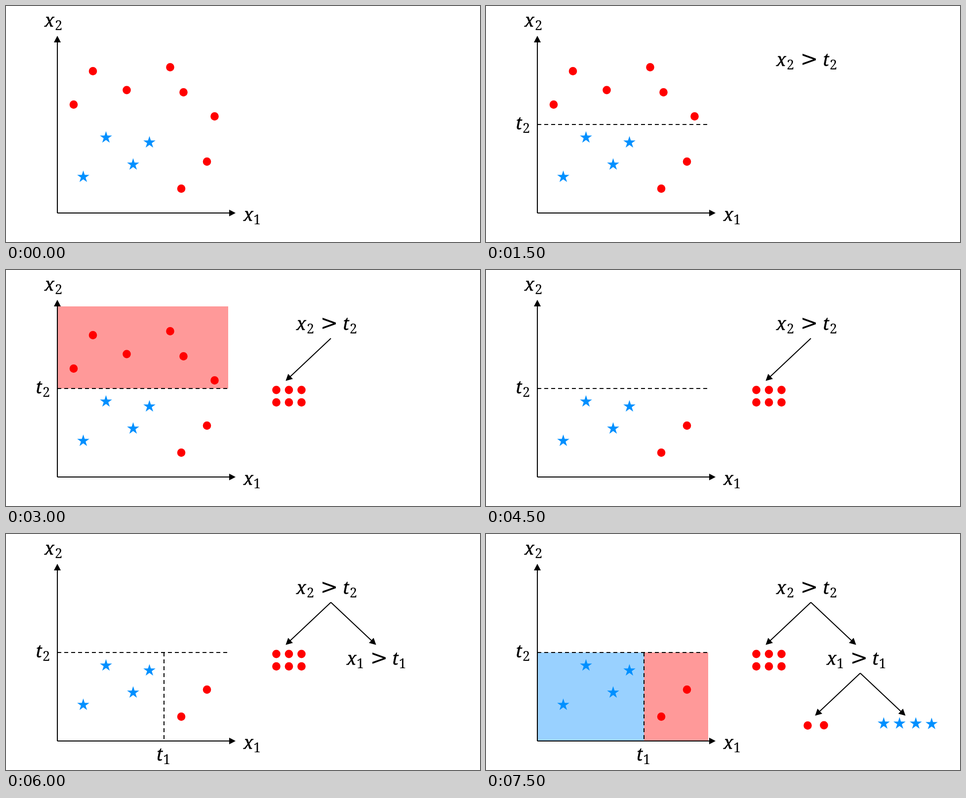
An HTML page for the animation above (8 s loop, 960 by 480 pixels).

```html
<!DOCTYPE html>
<html lang="en">
<head>
<meta charset="utf-8">
<title>Decision tree splits</title>
<style>
  html, body { margin: 0; width: 100%; height: 100%; overflow: hidden; background: #fff; }
  svg { display: block; width: 100%; height: 100%; }

  .line { fill: none; stroke: #000; stroke-width: 2; }
  .dash { stroke-dasharray: 8 6; }
  .arrow { marker-end: url(#head); }
  .red { fill: #f00; }
  .blue { fill: #0090ff; }
  .red-area { fill: #f99; }
  .blue-area { fill: #99d1ff; }

  text { font-family: "Noto Serif", serif; }
  .var { font-size: 36px; font-style: italic; stroke: #000; stroke-width: .4px; }
  .sub { font-size: 27px; }
  .op { font-size: 43px; font-family: "DejaVu Sans", sans-serif; }

  .split2, .area2, .leaf2, .points2, .split1, .result { animation: 8s step-end infinite; }
  .split2 { animation-name: split2; }
  .area2 { animation-name: area2; }
  .leaf2 { animation-name: leaf2; }
  .points2 { animation-name: points2; }
  .split1 { animation-name: split1; }
  .result { animation-name: result; }
  @keyframes split2 { 0% { opacity: 0 } 18.75%, 100% { opacity: 1 } }
  @keyframes area2 { 0% { opacity: 0 } 37.5% { opacity: 1 } 56.25%, 100% { opacity: 0 } }
  @keyframes leaf2 { 0% { opacity: 0 } 37.5%, 100% { opacity: 1 } }
  @keyframes points2 { 0% { opacity: 1 } 56.25%, 100% { opacity: 0 } }
  @keyframes split1 { 0% { opacity: 0 } 75%, 100% { opacity: 1 } }
  @keyframes result { 0% { opacity: 0 } 93.75%, 100% { opacity: 1 } }
</style>
</head>
<body>
<svg viewBox="0 0 960 480">
  <defs>
    <marker id="head" markerUnits="userSpaceOnUse" markerWidth="14" markerHeight="14" refX="1" refY="7" orient="auto">
      <path d="M0 0L13.5 7L0 14Z"/>
    </marker>
    <ellipse id="dot" class="red" rx="8.3" ry="8.5"/>
    <path id="star" class="blue" d="M0-13L2.9-4H12.3L4.7 1.6L7.6 10.5L0 5L-7.6 10.5L-4.7 1.6L-12.3-4H-2.9Z"/>
    <g id="x1"><text class="var">x</text><text class="sub" x="20" y="7.3">1</text></g>
    <g id="x2"><text class="var">x</text><text class="sub" x="21" y="7.3">2</text></g>
    <g id="t1"><text class="var">t</text><text class="sub" x="13.5" y="7.3">1</text></g>
    <g id="t2"><text class="var">t</text><text class="sub" x="14" y="7.3">2</text></g>
    <path id="left" class="line arrow" d="M0 0L-82.5 78"/>
    <path id="right" class="line arrow" d="M0 0L82.5 78"/>
  </defs>

  <!-- Regions -->
  <path class="red-area area2" d="M105 74H450V241H105Z"/>
  <g class="result">
    <path class="blue-area" d="M105 241H320V421H105Z"/>
    <path class="red-area" d="M320 241H450V421H320Z"/>
  </g>

  <!-- Axes -->
  <path class="line arrow" d="M104 421V73"/>
  <path class="line arrow" d="M104 421H452.5"/>
  <use href="#x2" x="78" y="42"/>
  <use href="#x1" x="481" y="437"/>

  <!-- First split -->
  <g class="split2">
    <path class="line dash" d="M104 241H450"/>
    <use href="#t2" x="60" y="250.5"/>
    <use href="#x2" x="588" y="121.5"/>
    <text class="op" x="636.5" y="121.5">&gt;</text>
    <use href="#t2" x="682" y="121.5"/>
  </g>
  <g class="leaf2">
    <use href="#left" x="658" y="139"/>
    <use href="#dot" x="547.5" y="244"/>
    <use href="#dot" x="573" y="244"/>
    <use href="#dot" x="598.5" y="244"/>
    <use href="#dot" x="547.5" y="269.3"/>
    <use href="#dot" x="573" y="269.3"/>
    <use href="#dot" x="598.5" y="269.3"/>
  </g>

  <!-- Second split -->
  <g class="split1">
    <path class="line dash" d="M320 241V421"/>
    <use href="#t1" x="304.5" y="460.5"/>
    <use href="#right" x="658" y="139"/>
    <use href="#x1" x="690" y="265.5"/>
    <text class="op" x="737.5" y="265.5">&gt;</text>
    <use href="#t1" x="782" y="265.5"/>
  </g>
  <g class="result">
    <use href="#left" x="758" y="283"/>
    <use href="#right" x="758" y="283"/>
    <use href="#dot" x="651.5" y="389.5"/>
    <use href="#dot" x="684.5" y="389"/>
    <use href="#star" x="805.5" y="385.5"/>
    <use href="#star" x="837.5" y="385.5"/>
    <use href="#star" x="870.5" y="385.5"/>
    <use href="#star" x="902.5" y="386.5"/>
  </g>

  <!-- Samples -->
  <g class="points2">
    <use href="#dot" x="176" y="132.5"/>
    <use href="#dot" x="244.5" y="171"/>
    <use href="#dot" x="332.5" y="124.5"/>
    <use href="#dot" x="359.5" y="175.5"/>
    <use href="#dot" x="137" y="200.5"/>
    <use href="#dot" x="422.5" y="224.5"/>
  </g>
  <use href="#dot" x="407" y="316.5"/>
  <use href="#dot" x="355" y="371.5"/>
  <use href="#star" x="202.5" y="267.5"/>
  <use href="#star" x="290.5" y="277.5"/>
  <use href="#star" x="257.5" y="322.5"/>
  <use href="#star" x="156.5" y="347.5"/>
</svg>
</body>
</html>
```
